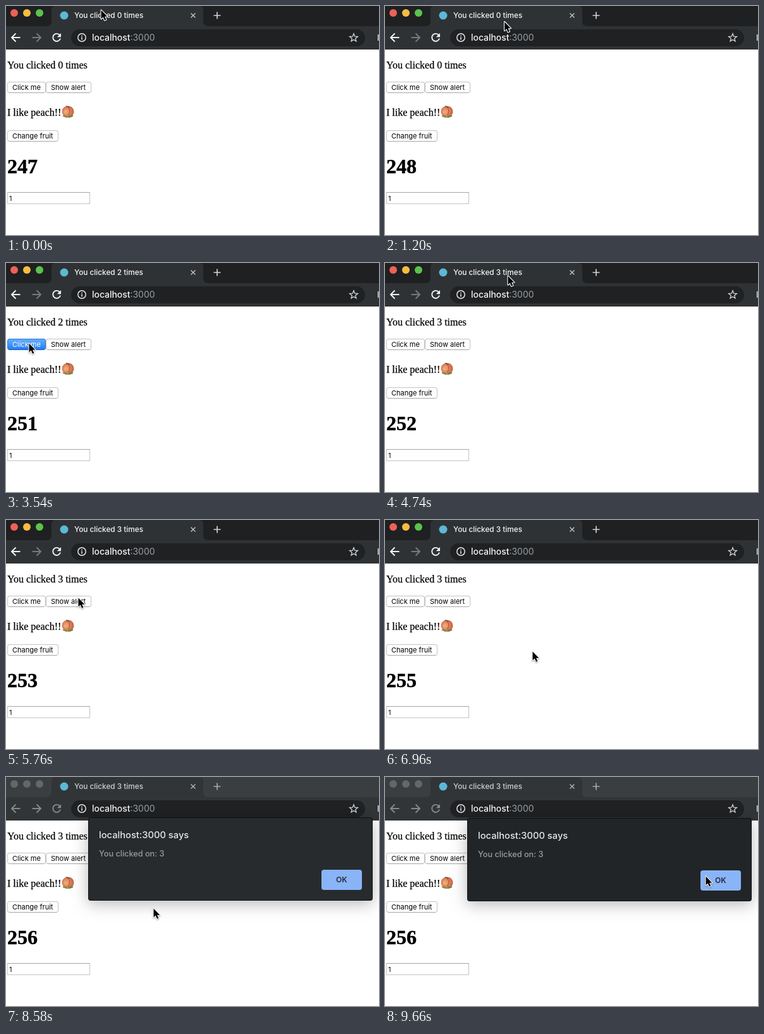
Animation, 590 px wide and 363 px high, one loop 9.72 s. Source, as an HTML page with a canvas:

```html
<!DOCTYPE html>
<html lang="en">
<head>
<meta charset="utf-8">
<title>Click counter</title>
<style>
  html, body { margin: 0; width: 100%; height: 100%; overflow: hidden; background: #fff; }
  canvas { display: block; width: 590px; height: 363px; }
</style>
</head>
<body>
<canvas id="stage"></canvas>
<script>
const W = 590, H = 363, LOOP = 9720, STEP = 60;
const SANS = 'Inter, Roboto, sans-serif';
const SERIF = '"Liberation Serif", "Noto Serif", serif';

const canvas = document.getElementById('stage');
const ctx = canvas.getContext('2d');
const dpr = window.devicePixelRatio || 1;
canvas.width = W * dpr;
canvas.height = H * dpr;

// Pointer stops: time, x, y
const path = [
  [60, 150, 6], [420, 36, 127],
  [540, 36, 127], [900, 194, 18], [960, 194, 21],
  [1140, 194, 21], [1680, 36, 127],
  [4080, 36, 127], [4440, 186, 16], [4620, 211, 1], [4740, 194, 20],
  [4920, 208, 10], [5100, 196, 22],
  [5400, 112, 124], [5760, 114, 123], [6120, 233, 208],
  [8640, 233, 208], [9420, 497, 145], [9660, 507, 157]
];
const clicks = [[1860, 2040], [2700, 2820], [3480, 3600]];
const alertPress = [5400, 5520];
const TITLE_LAG = 180, BLUR_AT = 8460, DIALOG_AT = 8520;

const within = (t, [a, b]) => t >= a && t < b;
const clicked = t => clicks.filter(c => t >= c[1]).length;
const ticks = t => 247 + Math.min(9, Math.floor((t + 165) / 890));

function pointerAt(t) {
  if (t <= path[0][0]) return path[0].slice(1);
  const i = path.findIndex(p => p[0] >= t);
  if (i < 0) return path[path.length - 1].slice(1);
  const [t0, x0, y0] = path[i - 1], [t1, x1, y1] = path[i];
  const u = (t - t0) / (t1 - t0), k = u * u * (3 - 2 * u);
  return [x0 + (x1 - x0) * k, y0 + (y1 - y0) * k];
}

function text(str, x, y, font, color) {
  ctx.font = font;
  ctx.fillStyle = color;
  ctx.fillText(str, x, y);
  return x + ctx.measureText(str).width;
}

// Page text, thickened a little like smoothed type
function serif(str, y, style, weight) {
  text(str, 2, y, style + ' ' + SERIF, '#000');
  ctx.strokeStyle = '#000';
  ctx.lineWidth = weight;
  ctx.strokeText(str, 2, y);
}

function rect(x, y, w, h, color) {
  ctx.fillStyle = color;
  ctx.fillRect(x, y, w, h);
}

function round(x, y, w, h, r, color) {
  ctx.beginPath();
  ctx.roundRect(x, y, w, h, r);
  ctx.fillStyle = color;
  ctx.fill();
}

function disc(x, y, r, color) {
  ctx.beginPath();
  ctx.arc(x, y, r, 0, 7);
  ctx.fillStyle = color;
  ctx.fill();
}

function ellipse(x, y, rx, ry, turn, color) {
  ctx.beginPath();
  ctx.ellipse(x, y, rx, ry, turn, 0, 7);
  ctx.fillStyle = color;
  ctx.fill();
}

function stroke(d, color, width) {
  ctx.strokeStyle = color;
  ctx.lineWidth = width;
  ctx.stroke(new Path2D(d));
}

function tabStrip(t, lit) {
  rect(0, 0, W, 32, lit ? '#1e2022' : '#3a3e40');
  const bar = lit ? '#2f3234' : '#313537';
  ctx.fillStyle = bar;
  ctx.fill(new Path2D('M64 32Q72 32 72 24V6Q72 0 78 0H306Q312 0 312 6V24Q312 32 320 32Z'));
  rect(0, 32, W, 37, bar);

  const grey = lit ? '#505356' : '#63676a';
  const lamps = t < BLUR_AT ? ['#ed6158', '#f5bd40', '#5cc24b'] : [grey, grey, grey];
  lamps.forEach((c, i) => disc(13 + 20 * i, 11, 6, c));

  disc(92, 15, 6.5, '#5cb8d6');
  text(`You clicked ${clicked(t - TITLE_LAG)} times`, 108, 19, '500 11.8px ' + SANS, lit ? '#f4f5f6' : '#cdd0d2');
  stroke('M292.5 11.5l7 7m0-7l-7 7', lit ? '#c3c6c9' : '#b4b7ba', 1.4);
  stroke('M328.5 15h11M334 9.5v11', lit ? '#d0d3d5' : '#a6aaac', 1.7);
}

function toolbar(lit) {
  const icon = lit ? '#f3f4f5' : '#85898b';
  stroke('M22.5 50H9.5M15.5 43.5L9 50l6.5 6.5', icon, 1.9);
  stroke('M41.5 50h13M48.5 43.5L55 50l-6.5 6.5', lit ? '#777b7f' : icon, 1.9);
  stroke('M85 46.2A6 6 0 1 0 86 51.5', icon, 1.9);
  ctx.fillStyle = icon;
  ctx.fill(new Path2D('M87 43v6.2h-6.2z'));

  round(103, 37, 465, 27, 13.5, '#1f2123');
  stroke('M126.2 50a6.2 6.2 0 1 0-12.4 0a6.2 6.2 0 1 0 12.4 0', '#e4e6e8', 1.5);
  rect(119.2, 46.6, 1.6, 1.6, '#e4e6e8');
  rect(119.2, 49.3, 1.6, 4.2, '#e4e6e8');
  const x = text('localhost', 136, 55, '500 13.9px ' + SANS, '#f4f5f6');
  text(':3000', x, 55, '14px ' + SANS, '#9aa0a6');

  ctx.beginPath();
  for (let i = 0; i < 10; i++) {
    const a = i * Math.PI / 5 - Math.PI / 2, r = i % 2 ? 2.9 : 6.7;
    ctx.lineTo(550 + r * Math.cos(a), 50.5 + r * Math.sin(a));
  }
  ctx.closePath();
  ctx.strokeStyle = '#d5d8da';
  ctx.lineWidth = 1.3;
  ctx.stroke();
  rect(588, 45, 1.4, 10, '#e4e6e8');
}

function button(label, x, y, w, pressed) {
  round(x, y, w, 18, 4, pressed ? '#2d74d6' : '#c4c4c4');
  rect(x + 3, y + 17, w - 6, 1, pressed ? '#1b55ad' : '#a6a6a6');
  let fill = '#fff';
  if (pressed) {
    fill = ctx.createLinearGradient(0, y, 0, y + 18);
    fill.addColorStop(0, '#6bb1fa');
    fill.addColorStop(1, '#1c7bf5');
  }
  round(x + 1, y + 1, w - 2, 16, 3.2, fill);
  text(label, x + 8, y + 13, '11px ' + SANS, pressed ? '#fff' : '#000');
}

function peach(x, y) {
  const skin = ctx.createRadialGradient(x - 4, y + 1, 1, x, y, 11);
  skin.addColorStop(0, '#f2ab7e');
  skin.addColorStop(0.5, '#e08259');
  skin.addColorStop(1, '#b9573f');
  ellipse(x - 2, y, 7.4, 8, 0.2, skin);
  ellipse(x + 2.6, y, 6.8, 8, -0.2, skin);
  stroke(`M${x + 1} ${y - 6}q4 6 -1 13`, '#a9503a', 1);
  ellipse(x - 4, y + 8, 4.5, 1.5, 0.3, '#8d8a42');
  ellipse(x + 4, y + 8, 4.5, 1.5, -0.3, '#77813c');
  stroke(`M${x - 3} ${y - 8}q4 0 5 2`, '#6d4630', 1.7);
}

function page(t) {
  rect(0, 69, W, H - 69, '#fff');
  serif(`You clicked ${clicked(t)} times`, 99, '16px', 0.25);
  button('Click me', 2, 120, 61, clicks.some(c => within(t, c)));
  button('Show alert', 63, 120, 72, within(t, alertPress));
  serif('I like peach!!', 174, '16px', 0.25);
  peach(98, 167);
  button('Change fruit', 2, 197, 81, false);
  serif(String(ticks(t)), 265, 'bold 32px', 0.5);

  rect(2, 295, 131, 19, '#c4c4c4');
  rect(2, 295, 131, 1, '#a6a6a6');
  rect(3, 296, 129, 17, '#fff');
  text('1', 5, 309, '11px ' + SANS, '#000');
}

function dialog(t) {
  const age = t - DIALOG_AT;
  ctx.save();
  ctx.globalAlpha = age < 60 ? 0.6 : 1;
  ctx.translate(0, age < 60 ? -2 : age < 120 ? -1 : 0);
  ctx.save();
  ctx.shadowColor = 'rgba(0,0,0,.28)';
  ctx.shadowBlur = 24 * dpr;
  ctx.shadowOffsetY = 5 * dpr;
  round(130, 65, 450, 132, 4, '#0e1011');
  ctx.restore();
  round(131, 66, 448, 130, 3, age < 120 ? '#272b2d' : '#212527');
  text('localhost:3000 says', 147, 98, '500 14.7px ' + SANS, '#e6e8ea');
  text('You clicked on: 3', 147, 127, '500 12.7px ' + SANS, '#989da2');
  round(499, 148, 64, 32, 4, '#8ab4f8');
  text('OK', 522, 168, '600 12px ' + SANS, '#202b3c');
  ctx.restore();
}

const arrow = new Path2D('M.5 .5V14.6L3.7 11.6L6 16.8L8.4 15.8L6.1 10.7H10.4Z');
function pointer([x, y]) {
  ctx.save();
  ctx.translate(x, y);
  ctx.lineJoin = 'round';
  ctx.strokeStyle = '#fff';
  ctx.lineWidth = 2.2;
  ctx.shadowColor = 'rgba(0,0,0,.4)';
  ctx.shadowBlur = 2 * dpr;
  ctx.shadowOffsetY = dpr;
  ctx.stroke(arrow);
  ctx.shadowColor = 'transparent';
  ctx.fillStyle = '#000';
  ctx.fill(arrow);
  ctx.restore();
}

function draw(now) {
  const t = Math.floor(now % LOOP / STEP) * STEP;
  const lit = t < DIALOG_AT;
  ctx.setTransform(dpr, 0, 0, dpr, 0, 0);
  tabStrip(t, lit);
  toolbar(lit);
  page(t);
  if (!lit) dialog(t);
  pointer(pointerAt(t));
}

const start = performance.now();
function frame() {
  draw(performance.now() - start);
  requestAnimationFrame(frame);
}
frame();
</script>
</body>
</html>
```
